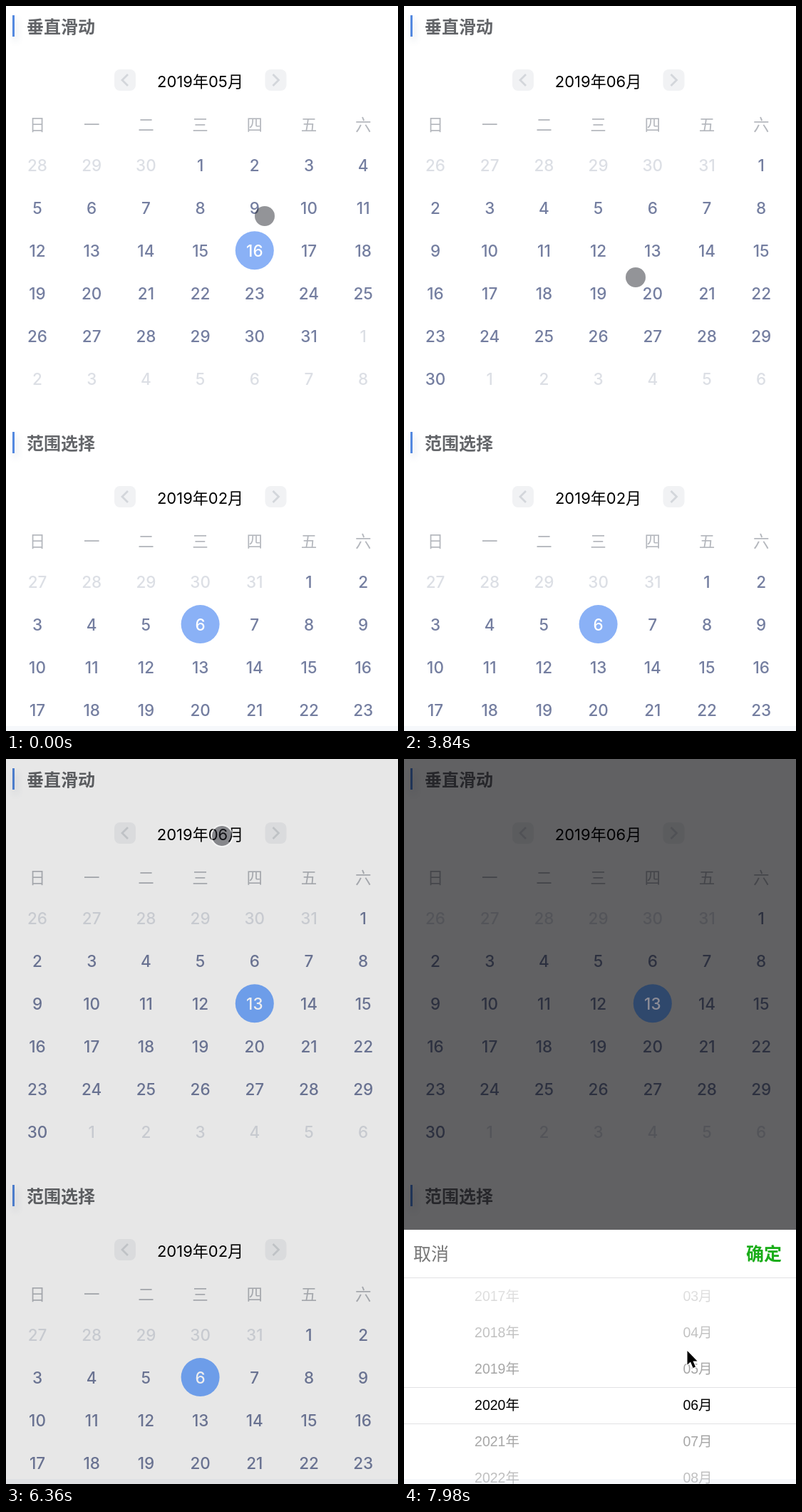
Write an HTML page with a canvas that moves like this. It is 550 px wide and 1018 px high and loops after 8 s.

```html
<!DOCTYPE html>
<html lang="zh-CN">
<head>
<meta charset="utf-8">
<style>
  html, body { margin: 0; width: 100%; height: 100%; overflow: hidden; background: #fff; }
  canvas { display: block; }
</style>
</head>
<body>
<canvas id="stage" width="550" height="1018"></canvas>
<script>
const W = 550, H = 1018, LOOP = 8000;
const ctx = document.getElementById('stage').getContext('2d');
const CJK = '"Noto Sans CJK SC", "Noto Sans CJK", sans-serif';
const UI = `Inter, ${CJK}`;
const WHEEL = `"Liberation Sans", ${CJK}`;

const MAY = { title: '2019年05月', lead: 3, prev: 30, length: 31 };
const JUNE = { title: '2019年06月', lead: 6, prev: 31, length: 30 };
const FEB = { title: '2019年02月', lead: 5, prev: 31, length: 28 };
const SECOND = 585, GRID_HEIGHT = 361;

const SLIDE = 2610, SELECT = 4200, OPEN = 6324, ARROW = 7920;
const PRESSES = [[1540, 1740], [2630, 2830], [4190, 4255], [6300, 6590], [7170, 7480]];
// time, x, y
const PATH = [
  [0, 363, 295], [840, 350, 346], [1080, 350, 346], [1440, 344, 355], [1700, 344, 355],
  [2400, 378, 104], [3300, 378, 104], [3840, 325, 381], [4080, 346, 346], [4530, 346, 346],
  [5340, 278, 97], [5440, 278, 97], [6180, 303, 108], [6600, 303, 108],
  [7100, 136, 908], [7180, 136, 908], [7460, 133, 858], [7560, 133, 858], [7980, 397.5, 831]
];

const clamp = v => Math.max(0, Math.min(1, v));
const mix = (a, b, p) => a + (b - a) * p;
const smooth = p => p * p * (3 - 2 * p);
const column = i => 44 + 76.2 * i;
const row = i => 223.5 + 60.1 * i;

// CSS "ease": cubic-bezier(.25, .1, .25, 1)
function ease(x) {
  if (x <= 0 || x >= 1) return clamp(x);
  let lo = 0, hi = 1, s = x;
  for (let i = 0; i < 20; i++) {
    s = (lo + hi) / 2;
    const bx = .75 * s * (1 - s) + s ** 3;
    if (bx < x) lo = s; else hi = s;
  }
  return .3 * s * (1 - s) ** 2 + 3 * s * s * (1 - s) + s ** 3;
}

function text(str, x, y, size, color, { align = 'center', weight = 400, family = UI } = {}) {
  ctx.font = `${weight} ${size}px ${family}`;
  ctx.textAlign = align;
  ctx.fillStyle = color;
  ctx.fillText(str, x, y);
}

function rect(x, y, w, h, color) {
  ctx.fillStyle = color;
  ctx.fillRect(x, y, w, h);
}

function disc(x, y, r, color) {
  ctx.fillStyle = color;
  ctx.beginPath();
  ctx.arc(x, y, r, 0, 7);
  ctx.fill();
}

function pageButton(x, y, dir) {
  ctx.fillStyle = '#f1f2f4';
  ctx.beginPath();
  ctx.roundRect(x - 15, y - 15, 30, 30, 8);
  ctx.fill();
  ctx.strokeStyle = '#d3d6db';
  ctx.lineWidth = 2.8;
  ctx.beginPath();
  ctx.moveTo(x - 4 * dir, y - 8);
  ctx.lineTo(x + 4 * dir, y);
  ctx.lineTo(x - 4 * dir, y + 8);
  ctx.stroke();
}

function header(y, heading, title) {
  ctx.save();
  ctx.shadowColor = 'rgba(70,90,130,.22)';
  ctx.shadowBlur = 10;
  ctx.shadowOffsetX = 3;
  ctx.shadowOffsetY = 6;
  rect(9, y + 13, 3, 30, '#5489e0');
  ctx.restore();
  text(heading, 29, y + 38, 24, '#636569', { align: 'left', weight: 700 });
  pageButton(167, y + 104, -1);
  pageButton(378.5, y + 104, 1);
  text(title, 272.5, y + 114, 22, '#000');
  [...'日一二三四五六'].forEach((d, i) => text(d, column(i), y + 175, 22.5, '#b4b7bd'));
}

function days(month, y) {
  for (let i = 0; i < 42; i++) {
    const n = i - month.lead + 1;
    const outside = n < 1 || n > month.length;
    const label = n < 1 ? n + month.prev : n > month.length ? n - month.length : n;
    text(label, column(i % 7), y + row(Math.floor(i / 7)) + 8, 22.5,
      outside ? '#dcdfe5' : '#747ea0', { weight: 500 });
  }
}

function selected(day, col, y, dim) {
  const shade = (a, b) => Math.round(mix(a, b, dim));
  disc(column(col), y - .5, 27, dim ? `rgb(${shade(120, 47)},${shade(172, 72)},${shade(255, 108)})` : '#8ab1f6');
  const grey = shade(255, 140);
  text(day, column(col), y + 8, 22.5, `rgb(${grey},${grey},${shade(255, 150)})`, { weight: 500 });
}

function wheel(x, top, value, label) {
  const middle = Math.round(value);
  for (let v = middle - 4; v <= middle + 4; v++)
    text(label(v), x, top + 252.5 + (v - value) * 51, 19.5, '#000', { family: WHEEL });
}

function veil(y, h, from, to) {
  const g = ctx.createLinearGradient(0, y, 0, y + h);
  g.addColorStop(0, `rgba(255,255,255,${from})`);
  g.addColorStop(1, `rgba(255,255,255,${to})`);
  rect(0, y, W, h, g);
}

function picker(top, year) {
  rect(0, top, W, 425, '#fff');
  ctx.save();
  ctx.beginPath();
  ctx.rect(0, top + 67, W, 357);
  ctx.clip();
  wheel(130.5, top, year, v => `${v}年`);
  wheel(412, top, 6, v => `${String(v).padStart(2, '0')}月`);
  veil(top + 67, 154, .92, .6);
  veil(top + 272, 153, .6, .92);
  ctx.restore();
  for (const y of [67, 221, 272]) rect(0, Math.round(top + y), W, 1, '#e2e2e4');
  text('取消', 13, top + 42.5, 25, '#777', { align: 'left' });
  text('确定', 530, top + 42.5, 25, '#1aad19', { align: 'right', weight: 700 });
}

function pointerAt(t) {
  const next = PATH.findIndex(p => p[0] > t);
  if (next < 0) return PATH.at(-1).slice(1);
  const [a, b] = [PATH[next - 1], PATH[next]];
  const p = smooth((t - a[0]) / (b[0] - a[0]));
  return [mix(a[1], b[1], p), mix(a[2], b[2], p)];
}

function pointer(t) {
  const [x, y] = pointerAt(t);
  if (t >= ARROW) {
    ctx.save();
    ctx.translate(x, y);
    const shape = new Path2D('M0 0V19.5L4.5 15.5L8 24L11.5 22.5L8 14.5H14Z');
    ctx.strokeStyle = '#fff';
    ctx.lineWidth = 2.4;
    ctx.stroke(shape);
    ctx.fillStyle = '#000';
    ctx.fill(shape);
    ctx.restore();
    return;
  }
  disc(x, y, 14, 'rgba(30,32,40,.48)');
  const press = PRESSES.find(([from, to]) => t >= from && t < to);
  if (press) {
    ctx.strokeStyle = 'rgba(255,255,255,.55)';
    ctx.lineWidth = 1 + 2 * clamp((t - press[0]) / 120);
    ctx.beginPath();
    ctx.arc(x, y, 14 + ctx.lineWidth / 2, 0, 7);
    ctx.stroke();
  }
}

function draw(t) {
  const slide = ease((t - SLIDE) / 500) * GRID_HEIGHT;
  const open = ease((t - OPEN) / 280);

  rect(0, 0, W, H, '#fff');
  header(0, '垂直滑动', t < SLIDE ? MAY.title : JUNE.title);
  ctx.save();
  ctx.beginPath();
  ctx.rect(0, 194, W, GRID_HEIGHT);
  ctx.clip();
  if (slide < GRID_HEIGHT) {
    days(MAY, -slide);
    selected(16, 4, row(2) - slide, 0);
  }
  if (slide > 0) days(JUNE, GRID_HEIGHT - slide);
  ctx.restore();
  header(SECOND, '范围选择', FEB.title);
  days(FEB, SECOND);

  if (open) rect(0, 0, W, H, `rgba(0,0,4,${.62 * open})`);
  if (t >= SELECT) selected(13, 4, row(2), open);
  selected(6, 3, SECOND + row(1), open);
  if (open) picker(661 + 424 * (1 - open), 2019 + smooth(clamp((t - 7190) / 400)));
  rect(0, 1011, W, 7, 'rgba(90,110,170,.05)');
  pointer(t);
}

function tick() {
  draw(performance.now() % LOOP);
  requestAnimationFrame(tick);
}
tick();
</script>
</body>
</html>
```
